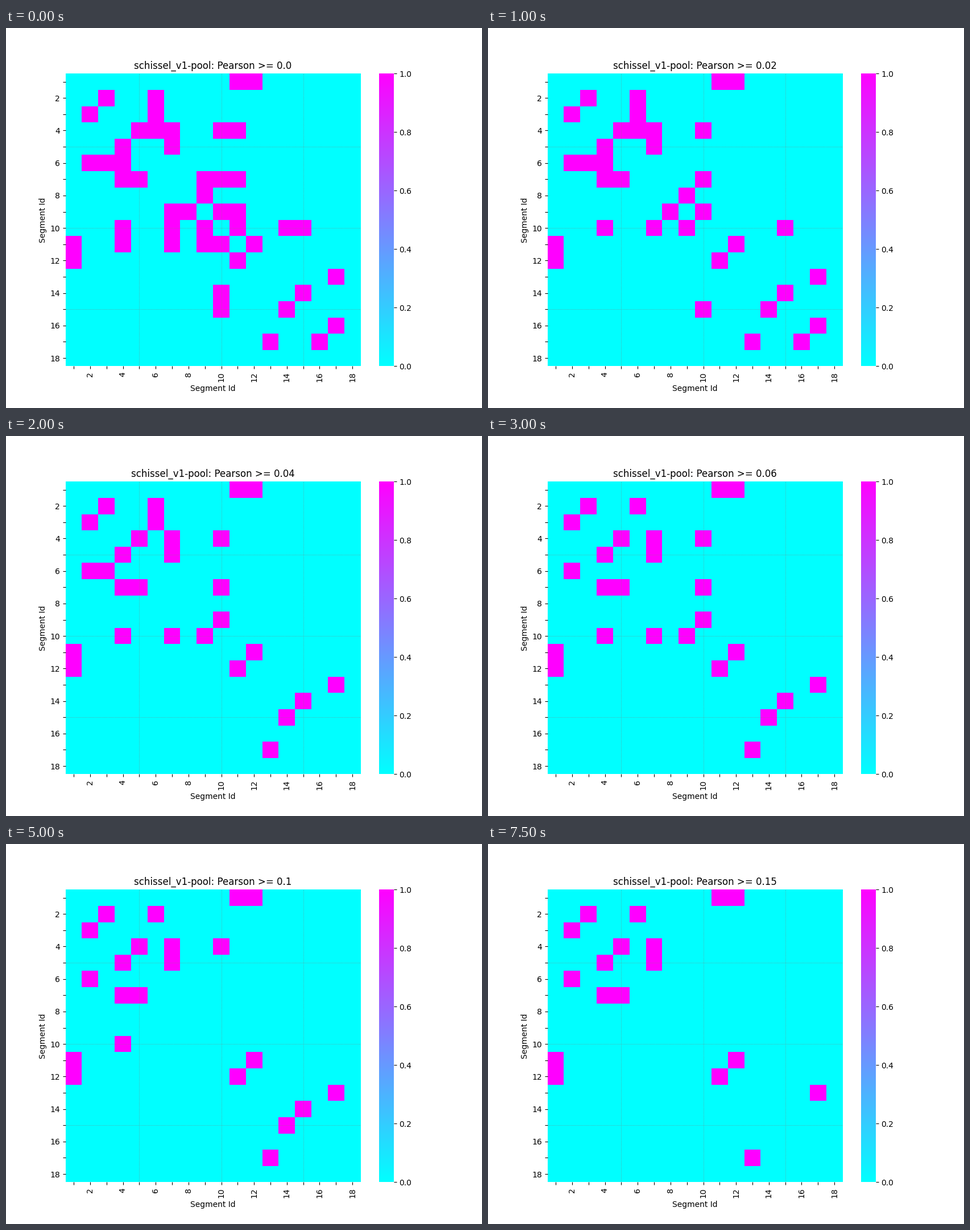
A matplotlib script for the animation above (8 s loop, 837x669 px).

```python
import numpy as np
import matplotlib.pyplot as plt
from matplotlib.animation import FuncAnimation

plt.rcParams["font.family"] = "DejaVu Sans"

WIDTH, HEIGHT, DPI = 837, 669, 100
SIZE = 18
STEPS = 16
STEP_MS = 500

# Segment pairs grouped by the first step at which they drop out.
DROPS = {
    1: [(4, 11), (7, 9), (7, 11), (9, 11), (10, 14)],
    2: [(10, 11)],
    3: [(4, 6), (8, 9), (16, 17)],
    4: [(10, 15)],
    5: [(3, 6)],
    7: [(7, 10), (9, 10)],
    11: [(4, 10)],
    12: [(14, 15)],
    STEPS: [(1, 11), (1, 12), (2, 3), (2, 6), (4, 5), (4, 7), (5, 7),
            (11, 12), (13, 17)],
}


def build_limits():
    limits = np.zeros((SIZE, SIZE))
    for step, pairs in DROPS.items():
        for a, b in pairs:
            limits[a - 1, b - 1] = limits[b - 1, a - 1] = step
    return limits


limits = build_limits()

# The small margin keeps the pixel size from rounding down.
fig, ax = plt.subplots(figsize=((WIDTH + 0.01) / DPI, (HEIGHT + 0.01) / DPI),
                       dpi=DPI)
mesh = ax.pcolormesh(limits > 0, cmap="cool", vmin=0, vmax=1, linewidth=0)
ax.set(xlim=(0, SIZE), ylim=(SIZE, 0), xlabel="Segment Id", ylabel="Segment Id")

centers = np.arange(SIZE) + 0.5
labels = ["" if n % 2 else str(n) for n in range(1, SIZE + 1)]
ax.set_xticks(centers, labels, rotation=90)
ax.set_yticks(centers, labels, rotation=0)
ax.spines[:].set_visible(False)

for pos in (4.5, 9.5, 14.5):
    for draw_line in (ax.axvline, ax.axhline):
        draw_line(pos, color="gray", linestyle=":", linewidth=0.5)

bar = fig.colorbar(mesh, ax=ax)
bar.outline.set_linewidth(0)
title = ax.set_title("")


def update(step):
    mesh.set_array((limits > step).astype(float))
    title.set_text(f"schissel_v1-pool: Pearson >= {round(step / 100, 2)}")
    return mesh, title


anim = FuncAnimation(fig, update, frames=STEPS, interval=STEP_MS,
                     repeat=True, repeat_delay=0, blit=False)
plt.show()
```
